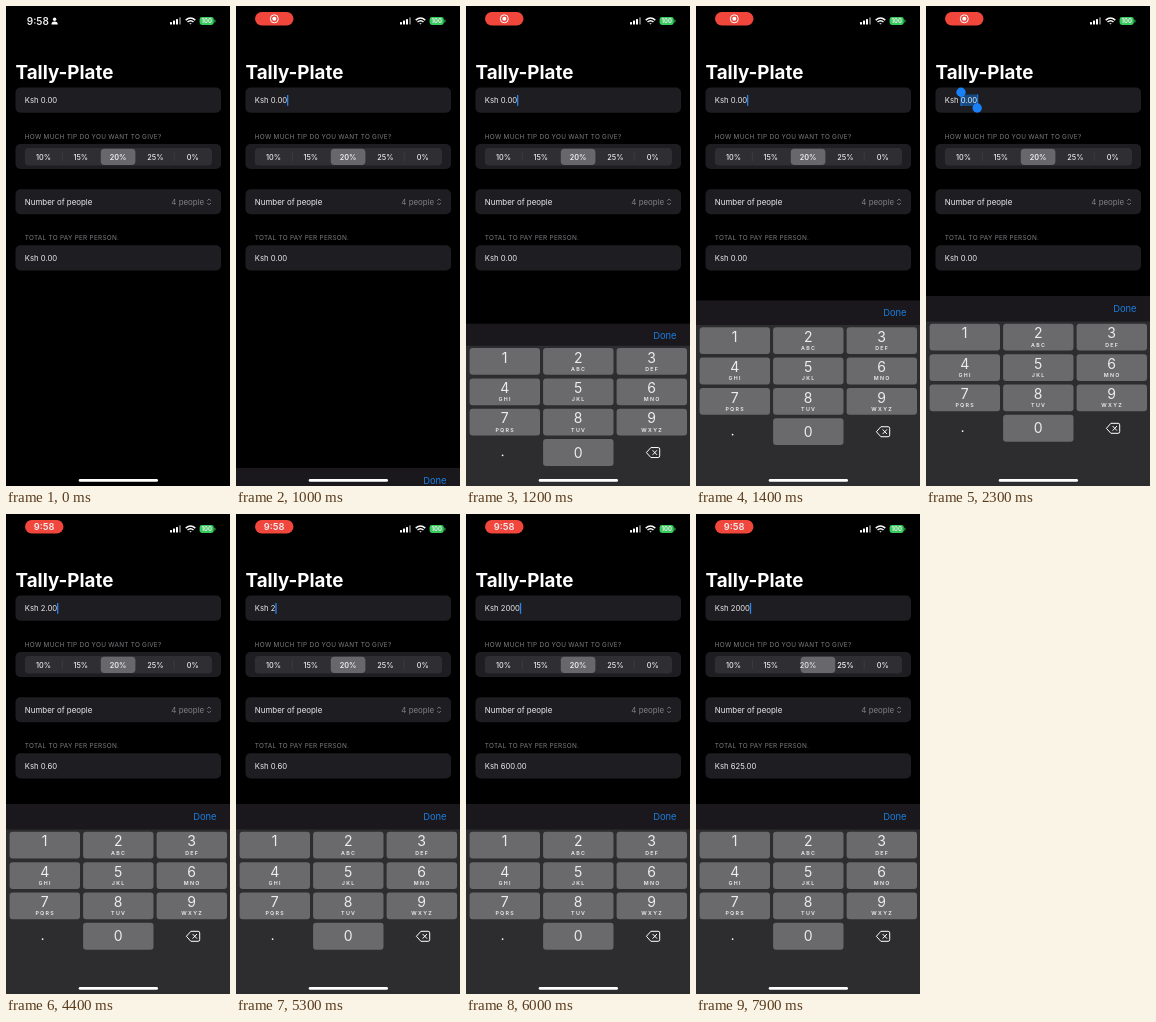
Write an HTML page that moves like this. It is 224x480 px and loops after 8000 ms.

```html
<!DOCTYPE html>
<html lang="en">
<head>
<meta charset="utf-8">
<title>Tip calculator</title>
<style>
  html, body { margin: 0; width: 100%; height: 100%; overflow: hidden; background: #000; }
  svg { display: block; width: 224px; height: 480px; background: #000; }
  text { font-family: Inter, Roboto, "Liberation Sans", sans-serif; font-size: 7.7px; fill: #ececee; white-space: pre; }
  .mid { text-anchor: middle; }
  .title { font-size: 18.8px; font-weight: 700; fill: #fff; }
  .head { font-size: 6.4px; letter-spacing: .27px; fill: #7c7c81; }
  .clock { font-size: 10px; font-weight: 600; }
  .seg { font-size: 7.3px; font-weight: 500; }
  .digit { font-size: 14px; }
  .abc { font-size: 5.3px; font-weight: 600; letter-spacing: 1.3px; }
  .menu { font-size: 5px; fill: #c4c4c8; }
  .card { fill: #1e1d21; }
</style>
</head>
<body>
<svg viewBox="0 0 224 480">
  <!-- status bar -->
  <g id="plain">
    <text class="clock mid" x="31.8" y="18.7">9:58</text>
    <circle cx="48.6" cy="13.2" r="1.7" fill="#fff"/>
    <path d="M45.4 18.4q0-3 3.2-3t3.2 3z" fill="#fff"/>
  </g>
  <g id="pill">
    <rect x="19" y="6" width="38.5" height="13.4" rx="6.7" fill="#f0463c"/>
    <g id="rec">
      <circle cx="38.3" cy="12.8" r="4" fill="none" stroke="#fff"/>
      <circle cx="38.3" cy="12.8" r="2" fill="#fff"/>
    </g>
    <text id="pillTime" class="clock mid" x="38.2" y="16.2" style="font-size:9.4px">9:58</text>
  </g>
  <g fill="#fff">
    <rect x="164" y="16" width="2" height="2.5" rx=".5"/>
    <rect x="167" y="14.6" width="2" height="3.9" rx=".5"/>
    <rect x="170" y="13" width="2" height="5.5" rx=".5"/>
    <rect x="173" y="11.2" width="2" height="7.3" rx=".5" opacity=".4"/>
  </g>
  <g fill="none" stroke="#fff" stroke-width="1.5">
    <path d="M179.7 14.1q4.8-4.2 9.6 0M181.5 16q3-2.6 6 0"/>
    <path d="M183.3 17.2h2.4l-1.2 1.2z" fill="#fff" stroke="none"/>
  </g>
  <rect x="193.6" y="11" width="14.2" height="8" rx="2.4" fill="#36cb5c"/>
  <rect x="208.4" y="13.5" width="1" height="3" rx=".5" fill="#36cb5c"/>
  <text class="mid" x="200.7" y="17.1" style="font-size:5.8px;font-weight:700">100</text>

  <!-- form -->
  <text class="title" x="9.5" y="73.2">Tally-Plate</text>
  <g class="card">
    <rect x="9.5" y="81.5" width="205.5" height="25.3" rx="5"/>
    <rect x="9.5" y="138" width="205.5" height="25" rx="5"/>
    <rect x="9.5" y="183.2" width="205.5" height="25" rx="5"/>
    <rect x="9.5" y="239.3" width="205.5" height="25.2" rx="5"/>
  </g>
  <g id="selection">
    <rect x="35" y="88.5" width="17" height="11.5" fill="#174a80"/>
    <path d="M35 86v14M51.7 88.5v13" stroke="#1a80f5" stroke-width="1"/>
    <circle cx="35" cy="86.2" r="4.7" fill="#1a80f5"/>
    <circle cx="51.2" cy="102" r="4.7" fill="#1a80f5"/>
  </g>
  <text id="amount" x="18.8" y="96.9"></text>
  <rect id="caret" y="89" width="1.3" height="10.8" fill="#2a83f0"/>
  <text class="head" x="18.8" y="133">HOW MUCH TIP DO YOU WANT TO GIVE?</text>
  <rect x="18.8" y="142" width="187.2" height="17.6" rx="4" fill="#2f2e33"/>
  <path d="M56.3 146.5v8.5M168.2 146.5v8.5" stroke="#444448" stroke-width=".7"/>
  <rect id="thumb" y="142.7" width="34.6" height="16.2" rx="3.6" fill="#68676c"/>
  <g id="tips"></g>
  <text x="18.8" y="198.6" style="font-size:7.9px">Number of people</text>
  <text x="198.2" y="198.6" text-anchor="end" style="font-size:7.9px;fill:#808085">4 people</text>
  <path d="M201.3 194.7l1.8-1.8 1.8 1.8M201.3 197l1.8 1.8 1.8-1.8" fill="none" stroke="#808085" stroke-width=".9"/>
  <text class="head" x="18.8" y="234.3">TOTAL TO PAY PER PERSON.</text>
  <text id="total" x="18.8" y="254.7"></text>

  <g id="menu">
    <rect x="22.5" y="69" width="113.5" height="13.3" rx="3.5" fill="#252527"/>
    <path d="M124 69h8.5a3.5 3.5 0 0 1 3.5 3.5v6.3a3.5 3.5 0 0 1-3.5 3.5h-8.5z" fill="#38383b"/>
    <text class="menu mid" x="33" y="77.5">Cut</text>
    <text class="menu mid" x="55.5" y="77.5">Copy</text>
    <text class="menu mid" x="80.3" y="77.5">Paste</text>
    <text class="menu mid" x="108.3" y="77.5">AutoFill</text>
    <path d="M128.7 73.8l1.8 1.9-1.8 1.9" fill="none" stroke="#c4c4c8" stroke-width=".8"/>
  </g>

  <!-- keyboard -->
  <g id="bar">
    <rect y="290" width="224" height="220" fill="#1a181d"/>
    <text x="210.6" y="305.8" text-anchor="end" style="font-size:9.4px;fill:#1b7ddd">Done</text>
  </g>
  <g id="pad">
    <rect y="315.5" width="224" height="200" fill="#2d2c2f"/>
    <g id="keys"></g>
    <circle cx="36.6" cy="425.1" r=".9" fill="#fff"/>
    <path d="M184.9 417.3h7.2q1.6 0 1.6 1.6v6.8q0 1.6-1.6 1.6h-7.2l-4.5-5zM186.6 420l4.4 4.6M191 420l-4.4 4.6" fill="none" stroke="#fff" stroke-width="1"/>
  </g>
  <rect x="72.7" y="473" width="79.3" height="2.8" rx="1.4" fill="#fff"/>
</svg>
<script>
const LOOP = 8000;
const $ = id => document.getElementById(id);

function add(parent, tag, attrs, text = '') {
  const el = document.createElementNS('http://www.w3.org/2000/svg', tag);
  for (const name in attrs) el.setAttribute(name, attrs[name]);
  el.textContent = text;
  parent.append(el);
  return el;
}

const tipLabels = ['10%', '15%', '20%', '25%', '0%'].map((label, i) =>
  add($('tips'), 'text', { class: 'seg mid', x: 37.4 + i * 37.35, y: 153.5 }, label));

const letters = ['', 'ABC', 'DEF', 'GHI', 'JKL', 'MNO', 'PQRS', 'TUV', 'WXYZ'];
const keys = {};
function addKey(digit, col, row, abc) {
  const x = 3.6 + col * 73.5, y = 317.8 + row * 30.35;
  keys[digit] = add($('keys'), 'rect', { x, y, width: 70.4, height: 26.8, rx: 3 });
  add($('keys'), 'text', { class: 'digit mid', x: x + 35.1, y: y + (digit ? 14.6 : 18.5) }, digit);
  if (abc) add($('keys'), 'text', { class: 'abc mid', x: x + 35.6, y: y + 22.8 }, abc);
}
letters.forEach((abc, i) => addKey(i + 1, i % 3, Math.floor(i / 3), abc));
addKey(0, 1, 3);

const entries = [
  [0, '0.00'], [3150, '2.00'], [4650, '2.0'], [4900, '2.'],
  [5150, '2'], [5520, '20'], [5700, '200'], [5880, '2000']
];
// key, press time, release time
const presses = [[2, 3050, 3200], [0, 3240, 3400], [0, 5500, 5590], [0, 5680, 5770], [0, 5860, 5950]];
const TAP = 7800;

const ramp = (t, a, b) => Math.min(1, Math.max(0, (t - a) / (b - a)));
const ease = p => p * p * (3 - 2 * p);
const between = (t, a, b) => t >= a && t < b;
const show = (id, opacity) => $(id).setAttribute('opacity', opacity);
const move = (id, y) => $(id).setAttribute('transform', `translate(0 ${y})`);
const write = (id, text) => { if ($(id).textContent !== text) $(id).textContent = text; };

function slideIn(t, tau) {
  if (t < 990) return 190;
  return t > 1700 ? 0 : 190 * Math.exp((990 - t) / tau);
}

function draw(t) {
  const grow = ease(ramp(t, 250, 550));
  show('plain', 1 - ramp(t, 200, 350));
  show('pill', grow);
  $('pill').setAttribute('transform', `translate(38.3 13) scale(${.5 + grow / 2}) translate(-38.3 -13)`);
  const swap = ramp(t, 3200, 3400);
  show('rec', 1 - swap);
  show('pillTime', swap);

  const value = entries.filter(e => e[0] <= t).pop()[1];
  const rate = t < TAP ? .2 : .25;
  write('amount', 'Ksh ' + value);
  write('total', 'Ksh ' + (value * (1 + rate) / 4).toFixed(2));

  const selecting = between(t, 2000, 3150);
  const blink = between(t % 1000, 500, 850) && !between(t, 4600, 6400);
  show('selection', selecting ? 1 : 0);
  show('caret', t >= 1000 && !selecting && !blink ? 1 : 0);
  $('caret').setAttribute('x', 18.7 + $('amount').getComputedTextLength());
  show('menu', ramp(t, 2450, 2600) * (1 - ramp(t, 3200, 3450)));

  $('thumb').setAttribute('x', 94.8 + 37.35 * ease(ramp(t, TAP, TAP + 300)));
  tipLabels.forEach((el, i) => el.style.fontWeight = i === (t < TAP ? 2 : 3) ? 600 : 500);

  move('bar', slideIn(t, 109.5));
  move('pad', slideIn(t, 102.5));
  for (const digit in keys) {
    const down = presses.some(([k, a, b]) => k == digit && between(t, a, b));
    keys[digit].setAttribute('fill', down ? '#49494b' : '#6a6a6c');
  }
}

function tick() {
  draw(performance.now() % LOOP);
  requestAnimationFrame(tick);
}
tick();
</script>
</body>
</html>
```
